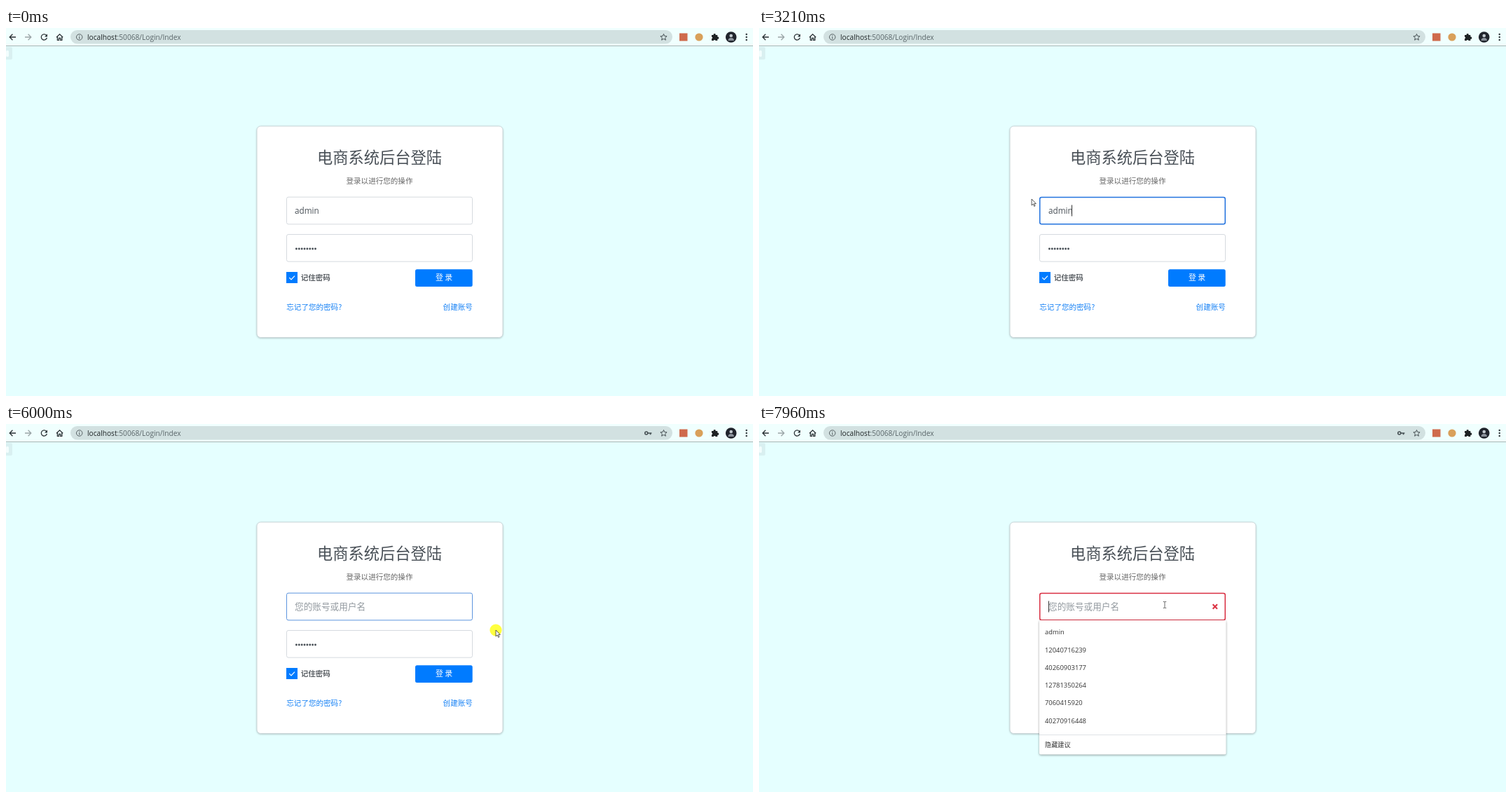
Recreate the animation shown at these times as an HTML page. Size 1066 by 525 pixels, loop 8000 ms.

```html
<!DOCTYPE html>
<html lang="zh-CN">
<head>
<meta charset="utf-8">
<title>Login</title>
<style>
html, body { margin: 0; width: 100%; height: 100%; overflow: hidden; background: #e5ffff; }
svg { display: block; width: 1066px; height: 525px; font-family: 'Noto Sans CJK SC', 'Noto Sans CJK', sans-serif; }
.lat { font-family: 'Open Sans', 'Noto Sans', sans-serif; }
.line { fill: none; stroke: #2b3236; stroke-width: 1.3; }
.card { fill: #fff; stroke: #c9d5d8; filter: drop-shadow(0 1px 1px rgba(0, 0, 0, .2)); }
.menu { fill: #fff; filter: drop-shadow(0 1px 1.5px rgba(0, 0, 0, .4)); }
.box { fill: #fff; stroke: #d5dadf; }
.hint { font-size: 12.65px; fill: #92999f; }
.small { font-size: 10.55px; }
.link { fill: #1580f5; }
.item { font-size: 9.4px; fill: #333; }
</style>
</head>
<body>
<svg viewBox="0 0 1066 525">
  <rect width="1066" height="525" fill="#e5ffff"/>
  <path d="M0 27H7a2 2 0 0 1 2 2V43a2 2 0 0 1-2 2H0z" fill="#d9f0f1"/>
  <rect x="0" y="32" width="4" height="9" rx="1.5" fill="#f2fdfd"/>

  <!-- toolbar -->
  <rect width="1066" height="25" fill="#f0fffe"/>
  <rect y="25" width="1066" height="1" fill="#a9b4b4"/>
  <rect x="92" y="3" width="859" height="19.5" rx="9.7" fill="#d2e1e1"/>
  <circle id="hover" cx="54.5" cy="13" r="9.7" fill="#d3dfdf"/>
  <g class="line">
    <path d="M14 13H5.5M9.4 8.8L5.2 13l4.2 4.2"/>
    <path d="M27 13h8.5M31.6 8.8l4.2 4.2-4.2 4.2" stroke="#9aa5a7"/>
    <path d="M57.6 10.3A4.1 4.1 0 1 0 58.4 14"/>
    <path d="M59 8.5v4h-4z" fill="#2b3236" stroke="none"/>
    <path d="M72 13.2l4.6-4.3 4.6 4.3M73.4 12.4v4.9h2.1v-3h2.2v3h2.1v-4.9"/>
    <circle cx="104.7" cy="13" r="4.2" stroke="#566063" stroke-width="1"/>
    <path d="M104.7 12.4v3M104.7 10.4v1.1" stroke="#566063" stroke-width="1.1"/>
    <path d="M938.5 8.5l1.3 3 3.3.3-2.5 2.2.8 3.2-2.9-1.7-2.9 1.7.8-3.2-2.5-2.2 3.3-.3z" stroke="#465054" stroke-width="1"/>
    <g id="key" stroke="#465054"><circle cx="913.8" cy="13" r="2" stroke-width="1.6"/><path d="M916 13h5.4M919.6 13v2.3" stroke-width="1.7"/></g>
  </g>
  <text class="lat" x="116" y="16.5" font-size="10.17" fill="#1f2527">localhost<tspan fill="#5a6669">:50068/Login/Index</tspan></text>
  <rect x="961" y="7.5" width="11.5" height="11" fill="#cf6a4c"/>
  <circle cx="989" cy="13" r="5.6" fill="#d9a05a"/>
  <path d="M1007 10h2.6a1.6 1.6 0 1 1 3.1 0h2.6v2.6a1.6 1.6 0 1 1 0 3.1v2.3h-2.7a1.5 1.5 0 0 0-2.9 0h-2.7v-2.7a1.5 1.5 0 0 0 0-2.9z" fill="#1d2224"/>
  <circle cx="1034.7" cy="13" r="7.8" fill="#20242c"/>
  <circle cx="1034.7" cy="11" r="2.3" fill="#c3cad0"/>
  <path d="M1030.5 18a4.2 4 0 0 1 8.4 0z" fill="#8b929b"/>
  <g fill="#2b3236"><circle cx="1056.7" cy="9" r="1.2"/><circle cx="1056.7" cy="13" r="1.2"/><circle cx="1056.7" cy="17" r="1.2"/></g>

  <!-- login card -->
  <rect class="card" x="358" y="140" width="351" height="301.5" rx="5.5"/>
  <text x="444" y="193.4" font-size="22.25" fill="#495057"><tspan font-weight="500">电商系统</tspan><tspan font-weight="300">后台登陆</tspan></text>
  <text class="small" x="485.5" y="222.3" fill="#666">登录以进行您的操作</text>

  <rect id="user" class="box" rx="2.5"/>
  <rect id="sel" x="413" y="252.5" height="16" fill="#2f86f6"/>
  <text id="name" class="lat" y="265" font-size="11.7" fill="#495057">admin</text>
  <text id="nameHint" class="hint" y="265.3">您的账号或用户名</text>
  <rect id="caret" y="252.5" width="1" height="16" fill="#333"/>
  <g id="error">
    <path d="M647.6 257.3l6.4 6.4M654 257.3l-6.4 6.4" stroke="#dc3545" stroke-width="2.1"/>
    <text x="400" y="291.6" font-size="9.3" font-weight="700" fill="#f00">用户名不能为空!</text>
  </g>

  <rect class="box" x="400.5" y="294.5" width="265" height="38.7" rx="2.5"/>
  <g id="dots" fill="#495057"></g>
  <text id="passHint" class="hint" x="412" y="318.3">您的密码</text>

  <rect class="box" x="400.5" y="348.5" width="15" height="15" stroke="#cdd2d6"/>
  <g id="tick"><rect x="400" y="348" width="16" height="16" fill="#007bff"/><path d="M404.3 356.2l2.7 2.7 5-5.2" fill="none" stroke="#fff" stroke-width="1.2"/></g>
  <text class="small" x="420.7" y="360" font-weight="700" fill="#5c6166">记住密码</text>
  <rect id="btn" x="584" y="344.3" width="81.7" height="24.7" rx="2.5"/>
  <text x="625" y="360.3" font-size="10.9" text-anchor="middle" fill="#fff">登 录</text>
  <text class="small link" x="400.3" y="401.9">忘记了您的密码?</text>
  <text class="small link" x="623.6" y="401.9">创建账号</text>

  <g id="menu">
    <rect class="menu" x="400" y="280" width="266.5" height="191.5" rx="2"/>
    <rect x="400" y="443" width="266.5" height="1" fill="#dfe3e6"/>
    <text x="408" y="461" font-size="9.2" fill="#333">隐藏建议</text>
  </g>

  <!-- pointer -->
  <g id="mouse">
    <circle id="press" r="8.6" fill="#ffff1e" fill-opacity=".85"/>
    <path id="arrow" d="M0 0v9l2.1-1.9 1.5 3.3 1.4-.6-1.5-3.2h2.8z" fill="#fff" stroke="#333" stroke-width=".8"/>
    <path id="beam" d="M-2.2-4.5h1.6l.6.5.6-.5h1.6M0-4v8M-2.2 4.5h1.6l.6-.5.6.5h1.6" fill="none" stroke="#555" stroke-width=".9"/>
    <path id="hand" d="M-1 0q1-1 2 0v4l4 .8q1 .4 .9 1.7l-.8 4.5h-5l-3.3-4.5q.3-1.2 2.2.3z" fill="#fff" stroke="#333" stroke-width=".8"/>
  </g>
</svg>
<script>
const LOOP = 8000;
const NS = 'http://www.w3.org/2000/svg';
const $ = id => document.getElementById(id);
const show = (id, on) => { $(id).style.display = on ? '' : 'none'; };
const set = (id, attrs) => { for (const k in attrs) $(id).setAttribute(k, attrs[k]); };
const add = (id, tag, attrs, text = '') => {
  const el = document.createElementNS(NS, tag);
  for (const k in attrs) el.setAttribute(k, attrs[k]);
  el.textContent = text;
  $(id).append(el);
};

for (let i = 0; i < 8; i++) add('dots', 'circle', { cx: 414.4 + i * 3.87, cy: 315, r: 1.45 });
['admin', '12040716239', '40260903177', '12781350264', '7060415920', '40270916448'].forEach((s, i) =>
  add('menu', 'text', { class: 'item lat', x: 408, y: 300.4 + i * 25.25 }, s));

// time, x, y of the pointer
const PATH = [
  [360, 934, 511], [1130, 67, 49], [1200, 66, 47], [1480, 55, 9],
  [2840, 55, 9], [3210, 389, 244], [3610, 460, 252], [4040, 459, 252], [4400, 382, 252],
  [4600, 382, 252], [4860, 503, 281], [5650, 503, 281], [5870, 699, 294], [6070, 699, 294],
  [6370, 640, 377], [6480, 640, 377], [6640, 630, 360], [7330, 630, 360],
  [7520, 594, 297], [7680, 579, 258]
];
const PRESS = [[1580, 1720], [3680, 4600], [5930, 6110], [6700, 6870], [7770, 7890]];
const CARET = [[2010, 2530], [3030, 3530], [3680, 4080], [5420, 5920], [6830, 7330], [7830, 8000]];
const within = (list, t) => list.some(([a, b]) => t >= a && t < b);
const inside = ([x, y], l, top, r, b) => x >= l && x <= r && y >= top && y <= b;

function pointer(t) {
  const i = PATH.findIndex(p => p[0] > t);
  if (i < 0) return PATH[PATH.length - 1].slice(1);
  const [t0, x0, y0] = PATH[Math.max(0, i - 1)], [t1, x1, y1] = PATH[i];
  const u = t1 > t0 ? (t - t0) / (t1 - t0) : 0;
  const e = (u + u * u * (3 - 2 * u)) / 2;
  return [x0 + (x1 - x0) * e, y0 + (y1 - y0) * e];
}

// Border of the name field: colour and width
function border(t) {
  if (t >= 6830) return ['#d92f42', 1.5];
  if (t >= 5930) {
    const u = Math.min(1, (t - 5930) / 220);
    const mix = (a, b) => Math.round(a + (b - a) * u);
    return [`rgb(${mix(35, 213)},${mix(115, 218)},${mix(222, 223)})`, 1];
  }
  return t >= 2010 ? ['#2373de', 1.5] : ['#d5dadf', 1];
}

function draw(t) {
  const blank = t >= 1910 && t < 2010;
  const empty = blank || t >= 5420;
  const [color, w] = border(t);
  const shift = w > 1 ? 413 : 412;
  const failed = t >= 6830;

  set('user', { x: 400 + w / 2, y: 240.7 + w / 2, width: 266 - w, height: 39.7 - w });
  $('user').style.stroke = color;
  $('user').style.strokeWidth = w;

  const p = pointer(t);
  const selecting = t >= 4080 && t < 5420;
  const from = selecting ? Math.max(413, Math.min(447, p[0])) : 447;
  const left = t > 4400 ? 413 : from;
  set('sel', { x: left, width: 447 - left });
  show('sel', selecting);
  set('name', { x: shift, fill: selecting && left < 430 ? '#fff' : '#495057' });
  show('name', !empty);
  set('nameHint', { x: shift });
  show('nameHint', empty);
  set('caret', { x: empty ? 413 : 446 });
  show('caret', within(CARET, t));

  show('dots', !blank);
  show('tick', !blank);
  show('passHint', blank);
  show('key', t >= 5420);
  show('error', failed);
  show('menu', t >= 7890);

  const onButton = inside(p, 584, 344, 666, 369);
  const inField = inside(p, 400, 241, 666, 280) || inside(p, 400, 294, 666, 333);
  set('btn', { fill: onButton || failed ? '#006fe6' : '#007bff' });
  show('hover', t >= 360 && inside(p, 45, 3, 64, 23));
  show('mouse', t >= 360);
  set('mouse', { transform: `translate(${p[0].toFixed(2)} ${p[1].toFixed(2)})` });
  show('press', within(PRESS, t));
  show('beam', inField);
  show('hand', onButton);
  show('arrow', !inField && !onButton);
}

const start = performance.now();
function tick() {
  draw((performance.now() - start) % LOOP);
  requestAnimationFrame(tick);
}
tick();
</script>
</body>
</html>
```
